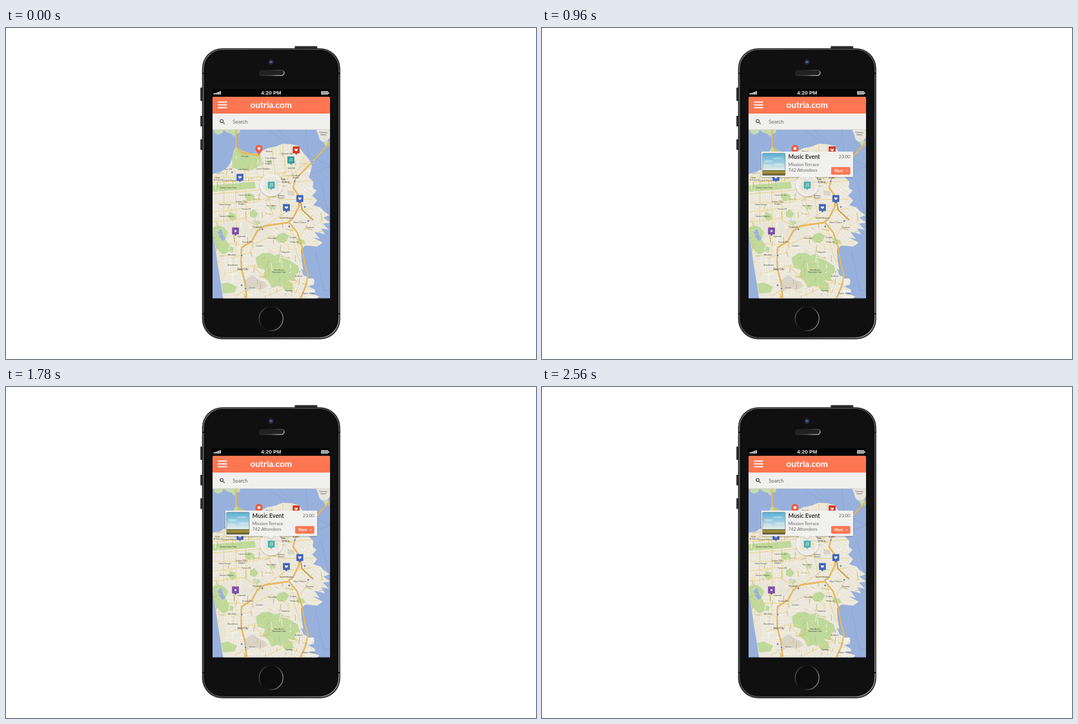
Animation, 947 px wide and 592 px high, one loop 2580 ms. Source, as an HTML page:

```html
<!DOCTYPE html>
<html lang="en">
<head>
<meta charset="utf-8">
<title>Event map</title>
<style>
  html, body { margin: 0; width: 100%; height: 100%; overflow: hidden; background: #fff; }
  svg { display: block; width: 947px; height: 592px; font-family: Lato, sans-serif; }
  .line { fill: none; stroke-linecap: round; stroke-linejoin: round; }
  .status, #labels { font-family: "Liberation Sans", Arial, sans-serif; }
  #labels { font-size: 3.7px; fill: #4a4944; text-anchor: middle; }
</style>
</head>
<body>
<svg viewBox="0 0 947 592">
  <defs>
    <linearGradient id="rim" x2="1" y2="1">
      <stop stop-color="#8a8a8a"/><stop offset=".3" stop-color="#555"/>
      <stop offset=".7" stop-color="#666"/><stop offset="1" stop-color="#bbb"/>
    </linearGradient>
    <linearGradient id="ring" x2="1" y2=".3">
      <stop stop-color="#666"/><stop offset=".35" stop-color="#161616"/>
      <stop offset=".6" stop-color="#161616"/><stop offset="1" stop-color="#777"/>
    </linearGradient>
    <linearGradient id="speaker" x2="1" y2=".5">
      <stop offset=".2" stop-color="#1c1c1c"/><stop offset=".75" stop-color="#555"/><stop offset="1" stop-color="#eee"/>
    </linearGradient>
    <linearGradient id="sky" x2="0" y2="1">
      <stop stop-color="#5aaed4"/><stop offset=".4" stop-color="#9acde2"/><stop offset=".75" stop-color="#e4eee8"/>
    </linearGradient>
    <linearGradient id="field" x2="0" y2="1">
      <stop stop-color="#3d4a33"/><stop offset=".3" stop-color="#b59f3c"/><stop offset="1" stop-color="#55532a"/>
    </linearGradient>
    <linearGradient id="coral" x2="0" y2="1">
      <stop stop-color="#ff7954"/><stop offset="1" stop-color="#ff7450"/>
    </linearGradient>
    <radialGradient id="halo">
      <stop offset=".4" stop-color="#fff" stop-opacity=".35"/><stop offset="1" stop-color="#fff" stop-opacity=".7"/>
    </radialGradient>
    <filter id="shadow" x="-30%" y="-30%" width="160%" height="170%">
      <feDropShadow dx="0" dy="1" stdDeviation="1.2" flood-opacity=".4"/>
    </filter>
    <pattern id="blocks" width="4" height="6.500" patternUnits="userSpaceOnUse" patternTransform="rotate(-3)">
      <path d="M0 0H4M0 0V6.500" stroke="#f8f6ee" stroke-width=".9"/>
    </pattern>
    <pattern id="slanted" width="4.500" height="6" patternUnits="userSpaceOnUse" patternTransform="rotate(38)">
      <path d="M0 0H4.500M0 0V6" stroke="#f8f6ee" stroke-width=".9"/>
    </pattern>
    <path id="coast" d="M369 261 L383 258 396 249 403 237 407 220 411 212 421 219 436 224 450 224 467 215 482 212 494 207 511 208 523 211 530 222 540 233 547 246 544 257 541 267 549 275 548 286 555 291 547 300 556 308 549 317 562 321 568 328 578 335 567 339 579 348 566 350 577 361 563 358 570 369 551 364 560 377 547 374 566 384 556 391 535 389 527 396 528 414 531 433 539 443 537 452 551 451 550 459 540 462 552 468 542 474 560 480 556 484 H388 L384 458 379 428 374 394 369 363Z"/>
    <clipPath id="land"><use href="#coast"/></clipPath>
    <clipPath id="map"><rect x="369" y="182" width="210" height="301.500"/></clipPath>
    <path id="badge" d="M-5.200 -6.200h10.400a1 1 0 0 1 1 1v10.400a1 1 0 0 1-1 1H2L0 9-2 6.200h-3.200a1 1 0 0 1-1-1v-10.400a1 1 0 0 1 1-1Z"/>
    <path id="heart" d="M0 2.600C-4.700 -.4 -2.500 -3.500 0 -1.300C2.500 -3.500 4.700 -.4 0 2.600Z"/>
    <path id="star" d="M0 -2.600 .8 -.8H2.600L1.200.5 1.700 2.400 0 1.300-1.700 2.400-1.200.5-2.600-.8H-.8Z"/>
    <g id="note"><path d="M-1.300 2V-1.900L2 -2.700V1.300" fill="none" stroke="#fff" stroke-width=".7"/>
      <circle cx="-1.900" cy="2" r=".8" fill="#fff"/><circle cx="1.400" cy="1.300" r=".8" fill="#fff"/></g>
  </defs>

  <!-- phone body -->
  <g fill="#2b2b2b">
    <rect x="516" y="32.500" width="40" height="6" rx="1" stroke="#777" stroke-width=".7"/>
    <rect x="347.300" y="106.500" width="5" height="24" rx="1"/>
    <rect x="347.300" y="157" width="5" height="19" rx="1"/>
    <rect x="347.300" y="199" width="5" height="19" rx="1"/>
    <rect x="350.300" y="36.300" width="247" height="520.500" rx="36"/>
  </g>
  <rect x="352.800" y="38.500" width="242" height="515.500" rx="34" fill="#151515" stroke="url(#rim)" stroke-width="1.200"/>
  <rect x="355.500" y="40.500" width="236.500" height="510.500" rx="32" fill="#101010" stroke="#070707"/>
  <path d="M351 511h5M592 511h5M351 81h5M592 81h5" stroke="#060606" stroke-width="2"/>
  <circle cx="473.700" cy="61" r="5" fill="#24252c"/>
  <circle cx="473.700" cy="61" r="2.800" fill="#33477e"/>
  <circle cx="473.200" cy="60.500" r="1" fill="#7a93cf"/>
  <rect x="452" y="75.500" width="45" height="9.500" rx="4.700" fill="#222" stroke="url(#speaker)" stroke-width="1.200"/>
  <circle cx="473.700" cy="520" r="21.300" fill="#0d0d0d" stroke="url(#ring)" stroke-width="1.700"/>

  <!-- status bar -->
  <rect x="367" y="108" width="213.500" height="376.500" fill="#050505" stroke="#222" stroke-width=".6"/>
  <g class="status" fill="#e8e8e8">
    <path d="M371 117h2v2h-2zM373.700 116h2v3h-2zM376.400 115h2v4h-2zM379.100 114h2v5h-2zM381.800 113h2v6h-2z"/>
    <text x="473.700" y="119.300" font-size="9.500" font-weight="700" text-anchor="middle">4:20 PM</text>
    <rect x="563.500" y="113.500" width="11.500" height="5" fill="#999" stroke="#ddd"/>
    <path d="M576 115h1.500v2.500H576z"/>
  </g>

  <!-- map -->
  <g clip-path="url(#map)">
    <rect x="369" y="182" width="210" height="302" fill="#98b1dc"/>
    <g class="line" stroke="#7f9bcd" stroke-width=".6" stroke-dasharray="3 1">
      <path d="M468 182 505 207M485 182 540 228 579 246M536 182 540 228M545 262 579 247M563 276 579 345M553 398 568 470 579 468"/>
    </g>
    <path d="M371 182h18l-3 6-7 3-6-3ZM389 182h30l-2 6-7 1-2 6-5-6-8-2Z" fill="#c6dcae"/>
    <path d="M554 182h25v13l-5 7-8 2-6-5-2-8Z" fill="#e8e4dc"/>
    <path d="M567 204l9-2 2 8-7 2Z" fill="#c6dcae"/>
    <use href="#coast" fill="#e9e5d8"/>
    <g clip-path="url(#land)">
      <path d="M369 250H460V345H369ZM456 205H540L515 267H456ZM390 375H470V483H390Z" fill="url(#blocks)"/>
      <path d="M460 265H580V395H470V345H460ZM490 395H560V484H470Z" fill="url(#slanted)"/>
      <g fill="#bfd99b">
        <path d="M411 212 455 226 457 239 446 253 427 255 403 250 403 235Z"/>
        <path d="M369 281 445 275 446 287 369 293Z"/>
        <path d="M369 357l10-4 11 4 7 9-5 12 7 10-3 14-9 3-10-10-8-12Z"/>
        <path d="M446 411 458 403 470 402 480 407 489 404 503 414 522 425 524 436 515 443 518 452 505 451 496 465 485 461 475 465 468 451 459 444 463 433 449 428Z"/>
        <path d="M487 369l10-3 9 6-5 10-13 2-7-7ZM430 294l13 4 3 10-11 2-9-7ZM400 329l9 3 3 9-8 5-8-8ZM436 328l8-4 7 9-6 7-9-3ZM444 346l7-2 4 5-8 4Z"/>
        <path d="M384 458l12-3 17 8-5 10-20 2ZM497 453l14 2 3 12-12 5-8-8ZM519 376l13 3 3 7-14 1ZM467 237l8-1v6h-8ZM470 320l7-3 5 6-8 4ZM400 390l7 3-2 9-6-4Z"/>
      </g>
      <path d="M424 451l17-9 10 8 11 4 5 9-13 5-15-4-9 8ZM503 290l11 2 2 8-13-1ZM451 239l8-2 2 7-8 3ZM440 345l6-4 3 7-6 3Z" fill="#d9d4ca"/>
      <path d="M378 362l7-2 2 9 5 8-5 4-7-9Z" fill="#98b1dc"/>
      <path d="M527 431l12 5v9l-7-2Z" fill="#98b1dc"/>
      <g class="line" id="streets"></g>
      <path class="line" d="M369 267H450L506 256M369 276 450 272 500 265M369 297 450 290 492 279M369 312H440L485 299M369 329 420 323M369 347 424 341 458 359M389 258V350M409 254 412 360M427 255 430 343M455 226 462 275 478 336M475 213 484 282 494 344M494 208 500 258 462 293M510 209 511 260M538 239 482 286M545 273 493 277M548 306 488 307M458 358 500 329 548 323M395 386 440 388 476 371M402 411 439 401M400 438 440 425 468 452M410 480 450 454M526 373 547 335M510 351 516 392 526 420M468 479 523 453" stroke="#ead381" stroke-width="1.100"/>
    </g>
    <g class="line">
      <path id="highway" d="M411 182V211L420 222 451 228M579 204 547 240 517 270 513 286 525 302 523 320 513 340 503 348 462 354 449 363 440 380 421 393 420 415 421 432 427 455 430 484M505 347 520 365 529 392 534 423 540 443 535 463 526 484M525 302 529 325 548 343" stroke="#d3a04e" stroke-width="2.300"/>
      <use href="#highway" stroke="#f5c566"/>
      <path d="M411 182V211L420 222 451 228M579 204 547 240 517 270 513 286 525 302 523 320 513 340 503 348 462 354 449 363 440 380 421 393 420 415 421 432 427 455 430 484M505 347 520 365 529 392 534 423 540 443 535 463 526 484" stroke="#f8c660" stroke-width="1.300"/>
    </g>
    <path d="M539 448h11v7h-6v5h-5zM535 469h17v4h-9v5h12v4h-17z" fill="#f0eee6"/>
    <g id="shields" fill="#6380b8" stroke="#fff" stroke-width=".6"></g>
    <g id="labels"></g>
    <g id="badges"></g>
    <g fill="#ee5d43">
      <path d="M452 228C450 223 445.500 220 445.500 215.500a6.500 6.500 0 0 1 13 0C458.500 220 454 223 452 228Z"/>
      <circle cx="452" cy="215.500" r="2.500" fill="#fff"/>
    </g>

    <!-- event card -->
    <g id="card" filter="url(#shadow)">
      <rect x="392" y="221" width="164" height="45.500" rx="1.500" fill="#f1f1f0"/>
      <path d="M467 266h13l-6.500 6Z" fill="#f1f1f0"/>
      <rect x="394" y="224" width="40.500" height="39.500" rx="1.500" fill="url(#sky)"/>
      <g fill="#fff" opacity=".3">
        <ellipse cx="405" cy="238" rx="8" ry="2"/><ellipse cx="421" cy="233" rx="9" ry="1.800"/>
        <ellipse cx="424" cy="244" rx="9" ry="2"/><ellipse cx="403" cy="246" rx="7" ry="1.500"/>
      </g>
      <rect x="394" y="254.500" width="40.500" height="9" fill="url(#field)"/>
      <rect x="394" y="224" width="40.500" height="39.500" rx="1.500" fill="none" stroke="#666" stroke-width=".6"/>
      <text x="440" y="233.500" font-size="10.400" font-weight="700" fill="#333">Music Event</text>
      <g font-size="8.100" fill="#666">
        <text x="551" y="233" text-anchor="end">23:00</text>
        <text x="440" y="247">Mission Terrace</text>
        <text x="440" y="257">742 Attendees</text>
      </g>
      <rect x="517" y="249" width="33.500" height="13" rx="1.500" fill="url(#coral)" stroke="#e9623f" stroke-width=".5"/>
      <text x="522.500" y="257.700" font-size="6.500" font-weight="700" fill="#fff">More</text>
      <path class="line" d="M544 254l1.500 1.700-1.500 1.700" stroke="#fff" stroke-width=".7"/>
    </g>

    <circle cx="474" cy="281" r="19.500" fill="url(#halo)" stroke="#fff" stroke-opacity=".7" filter="url(#shadow)"/>
    <g transform="translate(474 281)" opacity=".85"><use href="#badge" fill="#38aaa9"/><use href="#note"/></g>
  </g>

  <!-- header and search -->
  <path d="M369 125q0-2 2-2h206q2 0 2 2v28H369Z" fill="url(#coral)"/>
  <path d="M378.500 132.500h16.500M378.500 137.500h16.500M378.500 142.500h16.500" stroke="#fff" stroke-width="1.900"/>
  <text x="473.700" y="142.500" font-size="15.600" font-weight="700" fill="#fff" text-anchor="middle">outria.com</text>
  <rect x="369" y="153" width="210" height="29" fill="#f0f0ee"/>
  <path d="M369 181.700h210" stroke="#c9c9c5" stroke-width=".7"/>
  <g class="line" stroke="#555" stroke-width="1.400">
    <circle cx="385.300" cy="166.300" r="2.700"/><path d="M387.500 168.500l2.800 2.800"/>
  </g>
  <text x="405" y="171" font-size="9.100" fill="#666">Search</text>
</svg>
<script>
const LOOP = 2580;
const $ = id => document.getElementById(id);
const fill = (id, items, draw) => { $(id).innerHTML = items.map(draw).join(''); };

let seed = 7;
const random = () => (seed = seed * 16807 % 2147483647) / 2147483647;

// short stretches of street, some with a worn street name
fill('streets', Array.from({ length: 260 }), (_, i) => {
  const x = 370 + random() * 195, y = 215 + random() * 265;
  const upright = random() < .6, long = 4 + random() * 10, lean = random() * 5 - 2.5;
  const end = upright ? `${lean} ${long}` : `${long} ${lean}`;
  return `<path d="M${x} ${y}l${end}" stroke="${i % 3 ? '#ebd88c' : '#fffdf3'}" stroke-width=".9"/>` +
    (i % 3 === 1 ? `<path d="M${x} ${y}l${end}" stroke="#a58f4c" stroke-width=".6" stroke-dasharray="1 1.2"/>` : '');
});

fill('shields', [[404, 258], [458, 360], [421, 407], [428, 466], [516, 274], [547, 239], [506, 355], [534, 320], [540, 345], [421, 460]],
  ([x, y]) => `<circle cx="${x}" cy="${y}" r="2"/>`);

fill('labels', [
  ['Treasure', 567, 188], ['Island', 567, 192], ['Marina', 470, 222], ['Presidio', 427, 231],
  ['Russian Hill', 502, 226], ['Cow Hollow', 473, 234], ['Pacific', 469, 240], ['Heights', 469, 244],
  ['Sea Cliff', 397, 254], ['Lake Street', 423, 254], ['Laurel Heights', 459, 253], ['Nob Hill', 510, 252],
  ['Outer', 378, 269], ['Richmond', 379, 273], ['Central Richmond', 402, 274], ['South of', 518, 265], ['Market', 518, 269],
  ['Golden Gate Park', 397, 287], ['Mission', 492, 301], ['District', 492, 305], ['Inner Sunset', 427, 300],
  ['Outer Sunset', 391, 317], ['Golden Gate', 421, 312], ['Heights', 421, 316], ['Noe Valley', 474, 319],
  ['Forest Hill', 429, 325], ['Sunset Heights', 394, 338], ['Bernal Heights', 501, 341], ['Silver Terrace', 525, 349],
  ['Sunnyside', 449, 357], ['Excelsior', 476, 377], ['Bayview', 543, 358], ['Ingleside', 421, 374],
  ['Ocean View', 432, 384], ['Crocker', 453, 391], ['Portola', 513, 376], ['Visitacion', 515, 384],
  ['Broadmoor', 405, 425], ['Westlake', 404, 407], ['Bayshore', 500, 402], ['San Bruno', 488, 434],
  ['Mountain Park', 488, 438], ['Brisbane', 523, 445], ['Colma', 440, 466], ['Terrabay', 506, 471], ['Oyster Point', 540, 476],
], ([name, x, y]) => `<text x="${x}" y="${y}">${name}</text>`);
$('labels').innerHTML += '<g font-size="4.800" fill="#333"><text x="495" y="272">San</text>' +
  '<text x="496" y="277">Francisco</text><text x="423" y="433">Daly City</text></g>';

fill('badges', [
  [518.5, 218, '#cf3b29', 'heart'], [509, 236, '#2f9d9f', 'note'], [418, 267, '#4767b8', 'heart'],
  [525, 305, '#4767b8', 'heart'], [501, 321, '#4767b8', 'heart'], [410, 363, '#7d4fa8', 'star'],
], ([x, y, color, icon]) => `<g transform="translate(${x} ${y})" fill="#fff">
  <use href="#badge" fill="${color}"/><use href="#${icon}"/></g>`);

// the card springs up from its lower edge, overshoots and settles
const progress = (t, from, to) => Math.min(1, Math.max(0, (t - from) / (to - from)));
function cardScale(t) {
  const rise = 1 - (1 - progress(t, 340, 580)) ** 2;
  const settle = progress(t, 580, 820);
  return 1.29 * rise - .29 * settle * settle * (3 - 2 * settle);
}

function render() {
  const s = cardScale(performance.now() % LOOP);
  $('card').style.display = s > 0 ? '' : 'none';
  $('card').setAttribute('transform', `translate(472.500 266) scale(${s}) translate(-472.500 -266)`);
  requestAnimationFrame(render);
}
render();
</script>
</body>
</html>
```
